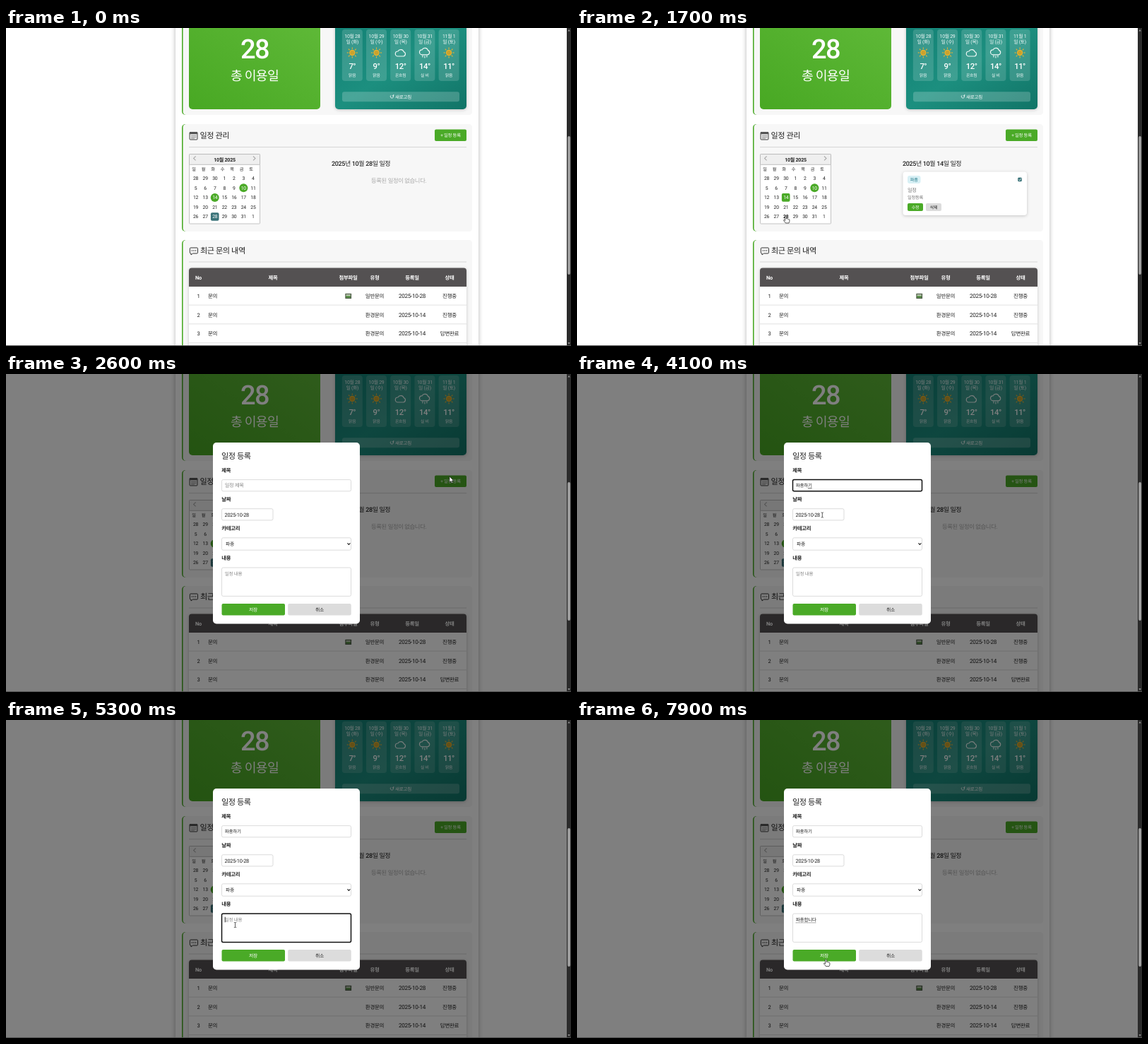
These frames come from a looping animation (800x450 px, 8 s). An HTML page:

```html
<!DOCTYPE html>
<html lang="ko">
<head>
<meta charset="utf-8">
<title>일정 관리</title>
<style>
  html, body { margin: 0; width: 100%; height: 100%; overflow: hidden; background: #fff; }
  svg { display: block; width: 800px; height: 450px; }
  text { font-family: Roboto, "Noto Sans CJK KR", "Noto Sans CJK", sans-serif; letter-spacing: -.04em; white-space: pre; text-rendering: geometricPrecision; }
  .page { filter: drop-shadow(0 0 3px rgba(0,0,0,.3)); }
  .card { filter: drop-shadow(0 1px 2px rgba(0,0,0,.2)); }
</style>
</head>
<body>
<svg id="stage" viewBox="0 0 800 450" xmlns="http://www.w3.org/2000/svg"></svg>
<script>
const LOOP = 8000, STEP = 100, SHIFT = 2.6;
const GREEN = '#4aaa27', TEAL = '#3a7379', INK = '#222';

// Markup helpers
const text = (x, y, s, size, { w = 400, f = INK, a = 'start', id = '' } = {}) =>
  `<text ${id && `id="${id}"`} x="${x}" y="${y}" font-size="${size}" font-weight="${w}" fill="${f}" text-anchor="${a}">${s}</text>`;
const mid = (x, y, s, size, o = {}) => text(x, y, s, size, { ...o, a: 'middle' });
const rect = (x, y, w, h, fill, r = 0, more = '') =>
  `<rect x="${x}" y="${y}" width="${w}" height="${h}" rx="${r}" fill="${fill}" ${more}/>`;
const path = (d, stroke, width = 1, more = '') =>
  `<path d="${d}" fill="none" stroke="${stroke}" stroke-width="${width}" ${more}/>`;
const group = (id, body, more = '') => `<g id="${id}" ${more}>${body}</g>`;
const at = (x, y, body) => `<g transform="translate(${x} ${y})">${body}</g>`;
const panel = (y, h, id = '') =>
  rect(249, y, 20, h, GREEN, 5, id && `id="${id}Edge"`) +
  rect(250.6, y, 409.4, h, '#f7f7f7', 4.5, id && `id="${id}"`);

// Weather
function sun() {
  let rays = '';
  for (let i = 0; i < 8; i++) {
    const c = Math.cos(i * Math.PI / 4), s = Math.sin(i * Math.PI / 4);
    rays += `M${5.2 * c} ${5.2 * s}L${7.6 * c} ${7.6 * s}`;
  }
  return `<circle r="3.6" fill="#c9a22e" stroke="#f0b32c" stroke-width="1.1"/>` + path(rays, '#f0b32c', 1.1);
}
const cloud = path('M-4 5H4A3.2 3.2 0 0 0 4.6 -1.2A4.6 4.6 0 0 0 -3.8 -2A3.5 3.5 0 0 0 -4 5Z', '#eef8f6', 1.2);
const rain = at(0, -2.2, cloud) + path('M-3 3.5v3M0 4.5v3M3 3.5v3', '#eef8f6', 1.1);

function weather() {
  const days = [
    ['10월 28', '화', sun(), 7, '맑음'], ['10월 29', '수', sun(), 9, '맑음'],
    ['10월 30', '목', cloud, 12, '온흐림'], ['10월 31', '금', rain, 14, '실 비'],
    ['11월 1', '토', sun(), 11, '맑음']
  ];
  const white = { f: '#f4fbfa' };
  return rect(466, -10, 186, 125, 'url(#teal)', 5, 'class="card"') +
    days.map(([date, day, icon, temp, label], i) => {
      const x = 490.3 + i * 34.2;
      return rect(x - 14.5, 2, 29, 73, 'rgba(255,255,255,.15)', 4) +
        mid(x, 14, date, 6.9, white) + mid(x, 21.8, `일 (${day})`, 6.9, white) +
        at(x, 35, icon) + mid(x, 58, temp + '°', 11.3, { f: '#fff', w: 500 }) +
        mid(x, 69, label, 5.9, white);
    }).join('') +
    rect(476, 90.3, 166, 14, 'rgba(255,255,255,.2)', 3) +
    path('M548.2 95.6A2.2 2.2 0 1 1 545 95.3M548.8 94v2h-2', '#fff', .8) +
    text(551, 100, '새로고침', 6.5, { f: '#fff' });
}

// Calendar
const colX = c => 268.6 + c * 13.55;
const rowY = r => 212.8 + r * 13.55;
const dayAt = n => [colX((n + 2) % 7), rowY(Math.floor((n + 2) / 7))];

function calendar() {
  let s = rect(259.5, 178.5, 100, 98.5, '#fff', 1, 'stroke="#c4c4c4" stroke-width="1"') +
    rect(259.5, 178.5, 100, 14.8, '#efefef', 1, 'stroke="#b9b9b9" stroke-width=".9"') +
    mid(309.5, 188.5, '10월 2025', 7.1, { w: 600 }) +
    path('M268.6 181.5l-3 2.9l3 2.9M350 181.5l3 2.9l-3 2.9', '#aaa', 1.1);
  [...'일월화수목금토'].forEach((d, i) => s += mid(266 + i * 13.5, 202.3, d, 6.2, { w: 500 }));
  for (const n of [10, 14, 28]) {
    const [x, y] = dayAt(n), fill = n === 28 ? TEAL : GREEN;
    if (n < 28) s += `<circle id="dot${n}" cx="${x}" cy="${y}" r="6" fill="${GREEN}"/>`;
    s += rect(x - 5.8, y - 5.8, 11.6, 11.6, fill, 2, `id="sel${n}"`);
  }
  for (let n = -2; n <= 32; n++) {
    const [x, y] = dayAt(n), marked = n === 10 || n === 14;
    s += mid(x, y + 2.4, n < 1 ? n + 30 : n > 31 ? n - 31 : n, 6.8, { f: marked ? '#fff' : INK, id: 'day' + n });
  }
  return s;
}

// Event list
function eventCard(y, badge, tint, ink, checked) {
  return rect(461.5, y, 175.5, 61.5, '#fff', 4, 'class="card"') +
    rect(468, y + 5.5, 18.5, 11, tint, 3) + mid(477.2, y + 13.3, badge, 6.2, { f: ink, w: 500 }) +
    rect(624.5, y + 8.4, 5, 5, checked ? TEAL : '#fff', 1, `stroke="${checked ? TEAL : '#999'}" stroke-width=".6"`) +
    (checked ? path(`M625.5 ${y + 11}l1.2 1.3l2 -2.7`, '#fff', .8) : '') +
    text(468, y + 28.4, '일정', 7.2, { f: '#777' }) + text(468, y + 38.4, '일정등록', 6.3, { f: '#777' }) +
    rect(468, y + 44.4, 22, 11, GREEN, 2) + mid(479, y + 52.2, '수정', 6, { f: '#fff' }) +
    rect(494, y + 44.4, 22, 11, '#dcdcdc', 2) + mid(505, y + 52.2, '삭제', 6);
}

function schedule() {
  return rect(260, 147.5, 11, 10.5, '#e8e8e8', 1, 'stroke="#444" stroke-width="1"') +
    rect(260, 147, 11, 3.3, '#555', 1) +
    path('M262 152.5h7.5M262 154.5h7.5M262 156.3h5', '#888', .8) +
    text(274.6, 156, '일정 관리', 11.1, { w: 500 }) +
    path('M259 168.6H652', '#d6d6d6') +
    rect(607, 143.5, 45, 16.6, GREEN, 2) + mid(629.5, 154.2, '+ 일정 등록', 6.4, { f: '#fff' }) +
    calendar() +
    text(461, 194.6, '', 9, { w: 500, id: 'heading' }) +
    text(517, 219, '등록된 일정이 없습니다.', 8.3, { f: '#aaa', id: 'empty' }) +
    group('first', eventCard(203.5, '파종', '#d8f0f5', '#1a7384', true)) +
    group('second', `<g clip-path="url(#list)">${eventCard(269.5, '수확', '#dcf3dc', '#35803a', false)}</g>` +
      rect(646.3, 185, 4.4, 56, '#8b8b8b', 2) +
      '<path d="M646.5 182.5l2 -2.6l2 2.6zM646.5 276.5l2 2.6l2 -2.6z" fill="#777"/>');
}

// Inquiries
function inquiries() {
  const cols = [272.5, 378, 484.5, 522, 575, 628];
  const rows = [['일반문의', '2025-10-28', '진행중'], ['환경문의', '2025-10-14', '진행중'], ['환경문의', '2025-10-14', '답변완료']];
  return panel(300, 170) +
    path('M261.5 311H270.3Q271.5 311 271.5 312.2V317.8Q271.5 319 270.3 319H264.5L262 321V319H261.5Q260.4 319 260.4 317.8V312.2Q260.4 311 261.5 311Z', '#333', 1) +
    '<g fill="#333"><circle cx="263.4" cy="315" r=".8"/><circle cx="266" cy="315" r=".8"/><circle cx="268.6" cy="315" r=".8"/></g>' +
    text(275, 319.3, '최근 문의 내역', 11.2, { w: 500 }) +
    path('M259 331H652', '#d6d6d6') +
    rect(259, 339.5, 393, 130, '#fff', 4, 'class="card"') +
    '<path d="M259 366V343.5a4 4 0 0 1 4 -4H648a4 4 0 0 1 4 4V366Z" fill="#545152"/>' +
    ['No', '제목', '첨부파일', '유형', '등록일', '상태'].map((h, i) => mid(cols[i], 355.6, h, 7.4, { f: '#fff', w: 700 })).join('') +
    rows.map(([kind, date, state], i) => {
      const y = 381.8 + i * 26.7;
      return mid(cols[0], y, i + 1, 7.6) + text(286, y, '문의', 7.5) + mid(cols[3], y, kind, 7.5) +
        mid(cols[4], y, date, 8.2) + mid(cols[5], y, state, 7.5) + path(`M259 ${y + 10.3}H652`, '#e2e2e2');
    }).join('') +
    rect(480.3, 375.7, 8.8, 7.2, '#53624c', .5) + rect(481.5, 377, 6.2, 2.2, '#b9c7b0') + rect(481.5, 379.2, 6.2, 2.2, '#5b9a49');
}

// Dialog
const field = (y, h, w = 183, id = '') =>
  rect(305.5, y, w, h, '#fff', 2, `stroke="#d2d2d2" stroke-width=".8" ${id && `id="${id}"`}`);
const label = (y, s) => text(305.3, y, s, 7.4, { w: 600 });

function dialog() {
  return rect(0, 0, 794, 449, 'rgba(0,0,0,.5)') + rect(293, 97, 208, 256.5, '#fff', 5) +
    text(305, 120.4, '일정 등록', 11.2, { w: 500 }) +
    label(138.7, '제목') + field(149.6, 16.2, 183, 'titleBox') + text(309.8, 160.3, '', 7.2, { id: 'titleText' }) +
    label(180, '날짜') + field(190.7, 16.2, 72.5) + text(309.6, 201.5, '2025-10-28', 7.4) +
    label(221, '카테고리') + field(231.8, 17.4) + text(311, 243.2, '파종', 6.8) +
    path('M483.4 239.4l2 2l2 -2', '#222', 1.1) +
    label(263.4, '내용') + field(274, 40.4, 183, 'bodyBox') + text(309.8, 285, '', 6.6, { id: 'bodyText' }) +
    path('', '#333', .7, 'id="underline"') + path('', '#000', .8, 'id="caret"') +
    rect(305.5, 325, 89.5, 16.4, GREEN, 2) + mid(350, 335.9, '저장', 6.8, { f: '#fff' }) +
    rect(399.2, 325, 89.5, 16.4, '#dcdcdc', 2) + mid(444, 335.9, '취소', 6.8);
}

const cursors =
  group('arrow', '<path d="M0 0V8.2L2 6.5L3.3 9.3L4.6 8.7L3.4 6H5.8Z" fill="#fff" stroke="#222" stroke-width=".7"/>') +
  group('hand', '<path d="M-.9 .8Q0 -.6 .9 .8V4Q2 3.4 2.6 4.2Q3.6 3.8 4.1 4.7Q5.4 4.4 5.4 5.8V7.4Q5.3 8.6 4.5 10H-.2Q-1.4 8 -2.9 6.6Q-3.1 5.2 -1.9 5.6L-.9 6.5Z" fill="#fff" stroke="#222" stroke-width=".75"/>') +
  group('beam', path('M-1.6 -3.6Q0 -3.6 0 -2.8Q0 -3.6 1.6 -3.6M0 -2.8V2.8M-1.6 3.6Q0 3.6 0 2.8Q0 3.6 1.6 3.6', '#333', .8));

document.getElementById('stage').innerHTML = `<defs>
  <linearGradient id="leaf" x1="0" y1="1" x2="1" y2="0"><stop offset="0" stop-color="#48a823"/><stop offset="1" stop-color="#5fb938"/></linearGradient>
  <linearGradient id="teal" x1="0" y1="0" x2="1" y2="1"><stop offset="0" stop-color="#128074"/><stop offset=".5" stop-color="#1c8f7f"/><stop offset="1" stop-color="#117467"/></linearGradient>
  <clipPath id="list"><rect x="455" y="200" width="190" height="82"/></clipPath></defs>` +
  rect(0, 0, 800, 450, '#fff') + rect(240, -10, 429, 480, '#fff', 0, 'class="page"') +
  panel(-20, 143) + rect(259, -10, 186, 125, 'url(#leaf)', 5) +
  mid(352, 43, '28', 38, { f: '#fff', w: 500 }) + mid(352, 74, '총 이용일', 18.3, { f: '#fff', w: 300 }) +
  weather() + panel(136, 152, 'plan') + schedule() + group('inquiries', inquiries()) +
  group('dialog', dialog()) +
  rect(794, 0, 6, 450, '#2b2b2b') + rect(795.2, 153, 3.8, 196, '#a0a0a0', 1.9) +
  '<path d="M795.5 4.5l1.6 -2.4l1.6 2.4zM795.5 445l1.6 2.4l1.6 -2.4z" fill="#999"/>' +
  rect(0, 449, 800, 1, '#505050') + group('cursor', cursors);

const $ = id => document.getElementById(id);
const show = (id, on) => $(id).setAttribute('display', on ? 'inline' : 'none');
const set = (id, attrs) => { for (const k in attrs) $(id).setAttribute(k, attrs[k]); };

// Pointer stops: time, x, y
const stops = [
  [200, 800, 300], [600, 336, 226], [900, 336, 226], [1100, 308.5, 234.5], [1200, 296, 240], [1500, 296, 240],
  [1700, 295.5, 266], [2000, 295.5, 266], [2400, 629, 144.5], [2500, 629, 144.5], [2600, 628, 145], [2800, 628, 145],
  [3200, 400, 158], [3900, 400, 158], [4100, 347.3, 199.5], [4400, 342, 240], [4600, 340, 240],
  [5000, 324.5, 290], [7000, 324.5, 290], [7400, 352.5, 338.5], [8000, 352.5, 338.5]
];
const selections = [[0, 28], [700, 10], [1300, 14], [1800, 28]];
const OPEN = 2600, TITLE = 3200, BODY = 5200, SAVE = 7700;
const titleKeys = 'ㅍ 파 팢 파조 파종 파종ㅎ 파종하 파종학 파종하기'.split(' ');
const bodyKeys = 'ㅍ 파 팢 파조 파종 파종ㅎ 파종하 파종합 파종합ㄴ 파종합니 파종합닏 파종합니다'.split(' ');

function pointer(t) {
  const i = stops.findIndex(s => s[0] > t);
  if (i < 1) return null;
  const [t0, x0, y0] = stops[i - 1], [t1, x1, y1] = stops[i];
  const p = (t - t0) / (t1 - t0), e = p * p * (3 - 2 * p);
  return [x0 + (x1 - x0) * e, y0 + (y1 - y0) * e];
}

const typed = (keys, t, start, pace) =>
  t < start ? '' : keys[Math.min(keys.length - 1, Math.floor((t - start) / pace))];

function drawCursor(t) {
  const pos = pointer(t), typing = (t >= 3400 && t < 3900) || (t >= 5600 && t < 7000);
  show('cursor', pos && !typing);
  if (!pos) return;
  const [x, y] = pos, inside = (l, r, top, b) => x > l && x < r && y > top && y < b;
  let kind = 'arrow';
  if (t < OPEN) {
    if (inside(260, 360, 206, 276) || inside(607, 652, 143, 160)) kind = 'hand';
  } else if (inside(305, 489, 149, 166) || inside(305, 378, 190, 207) || inside(305, 489, 274, 315)) kind = 'beam';
  else if (inside(305, 489, 325, 342)) kind = 'hand';
  for (const k of ['arrow', 'hand', 'beam']) show(k, k === kind);
  set('cursor', { transform: `translate(${x} ${y})` });
}

function drawSchedule(t) {
  const day = selections.filter(s => s[0] <= t).pop()[1], d = day === 10 ? SHIFT : 0;
  for (const n of [10, 14, 28]) {
    show('sel' + n, n === day);
    if (n < 28) show('dot' + n, n !== day);
  }
  set('day28', { fill: day === 28 ? '#fff' : INK, 'font-weight': day === 28 ? 400 : 700 });
  $('heading').textContent = `2025년 10월 ${day}일 일정`;
  show('empty', day === 28);
  show('first', day !== 28);
  show('second', day === 10);
  for (const id of ['plan', 'planEdge']) set(id, { height: 152 + d });
  set('inquiries', { transform: `translate(0 ${d})` });
}

function drawField(id, value, hint, focused) {
  $(id + 'Text').textContent = value || hint;
  set(id + 'Text', { fill: value ? INK : '#888' });
  set(id + 'Box', { stroke: focused ? '#111' : '#d2d2d2', 'stroke-width': focused ? 1.5 : .8 });
}

function drawDialog(t) {
  show('dialog', t >= OPEN);
  if (t < OPEN) return;
  const title = typed(titleKeys, t, 3300, 80), body = typed(bodyKeys, t, 5500, 110);
  const onTitle = t >= TITLE && t < BODY, onBody = t >= BODY && t < SAVE;
  drawField('title', title, '일정 제목', onTitle);
  set('titleText', { 'font-size': title ? 6.5 : 7.2 });
  drawField('body', body, '일정 내용', onBody);

  const value = onTitle ? title : body, size = onTitle ? 6.5 : 6.6;
  const y = onTitle ? 160.3 : 285, end = 309.8 + value.length * size * .88;
  const composing = (onTitle || onBody) && value;
  const marked = body && t >= 6900;
  set('underline', {
    d: marked ? `M309.8 ${y + 1.9}H${end}` : composing ? `M${end - size * .88} ${y + 1.3}H${end}` : '',
    'stroke-dasharray': marked ? '1 .8' : 'none'
  });
  const blink = (t - (onTitle ? TITLE : BODY)) % 1000 < 500;
  set('caret', { d: (onTitle || onBody) && !composing && blink ? `M310.2 ${y - 6.3}V${y + 1.3}` : '' });
}

function frame(now) {
  const t = Math.floor((now % LOOP) / STEP) * STEP;
  drawSchedule(t);
  drawDialog(t);
  drawCursor(t);
  requestAnimationFrame(frame);
}
frame(0);
</script>
</body>
</html>
```
